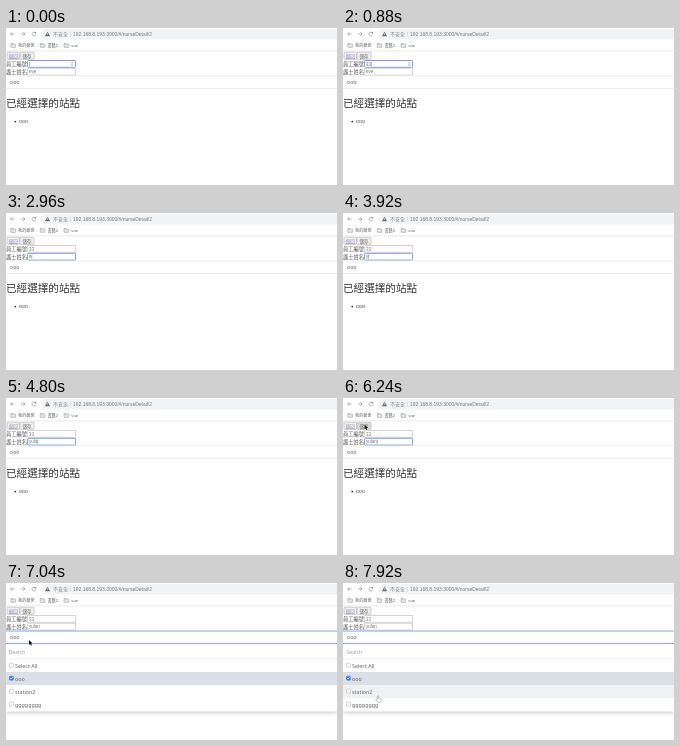
These frames come from a looping animation (331x157 px, 8 s). An HTML page with a canvas:

```html
<!DOCTYPE html>
<html lang="zh-Hant">
<head>
<meta charset="utf-8">
<title>Nurse detail</title>
<style>
html, body { margin: 0; width: 100%; height: 100%; overflow: hidden; background: #fff; }
canvas { display: block; width: 331px; height: 157px; }
</style>
</head>
<body>
<canvas id="stage"></canvas>
<script>
const W = 331, H = 157, LOOP = 8000;
const SANS = '"Liberation Sans", "Noto Sans CJK TC", "Noto Sans CJK", sans-serif';
const ROUND = '"Noto Sans", "Noto Sans CJK TC", "Noto Sans CJK", sans-serif';
const INK = '#85888c', LABEL = '#5c5c5c', VALUE = '#777', BLUE = '#7f9be6';
const canvas = document.getElementById('stage');
const ctx = canvas.getContext('2d');
const dpr = window.devicePixelRatio || 1;
canvas.width = W * dpr;
canvas.height = H * dpr;

// Time-ordered [ms, value] steps
const ID_STEPS = [[0, ''], [640, '3'], [880, '33']];
const NAME_STEPS = [[0, 'eve'], [2480, 'ev'], [2720, 'e'], [3120, ''], [3760, 'y'],
  [4080, 'yu'], [4400, 'yul'], [4640, 'yula'], [5040, 'yulan']];
const FOCUS_STEPS = [[0, 'id'], [2000, 'name'], [6400, ''], [6960, 'select']];

// [ms, x, y, shape]
const MOUSE = [
  [1040, 62, 37, 'beam'], [1440, 50, 42, 'beam'], [1920, 42, 43, 'beam'], [2160, 42, 43, ''],
  [5760, 40, 53, 'arrow'], [6080, 23, 30, 'arrow'], [6200, 21.5, 26.5, 'arrow'],
  [6480, 21.5, 26.5, 'arrow'], [6800, 23, 57, 'arrow'], [7200, 23, 57, 'arrow'],
  [7520, 27, 81, 'hand'], [7720, 33, 108, 'hand'], [7840, 34.5, 113, 'hand'], [8000, 34.5, 113, 'hand']
];

const stepAt = (steps, t) => steps.reduce((s, next) => t >= next[0] ? next : s);

// The caret restarts its blink on every key or focus change
function caretVisible(t) {
  const last = Math.max(...[ID_STEPS, NAME_STEPS, FOCUS_STEPS].map(s => stepAt(s, t)[0]));
  return (t - last) % 1000 < 500;
}

function mouseAt(t) {
  for (let i = 0; i < MOUSE.length - 1; i++) {
    const [t0, x0, y0, shape] = MOUSE[i], [t1, x1, y1] = MOUSE[i + 1];
    if (shape && t >= t0 && t < t1) {
      const k = (t - t0) / (t1 - t0), e = k * k * (3 - 2 * k);
      return { x: x0 + (x1 - x0) * e, y: y0 + (y1 - y0) * e, shape };
    }
  }
  return null;
}

function rect(x, y, w, h, color) {
  ctx.fillStyle = color;
  ctx.fillRect(x, y, w, h);
}

function box(x, y, w, h, r, fill, stroke, line = 0.7) {
  ctx.beginPath();
  ctx.roundRect(x, y, w, h, r);
  if (fill) { ctx.fillStyle = fill; ctx.fill(); }
  if (stroke) { ctx.strokeStyle = stroke; ctx.lineWidth = line; ctx.stroke(); }
}

function text(s, x, y, size, color, family = SANS) {
  ctx.font = `${size}px ${family}`;
  ctx.textBaseline = 'alphabetic';
  ctx.fillStyle = color;
  ctx.fillText(s, x, y);
  return ctx.measureText(s).width;
}

function stroke(points, color, width) {
  ctx.beginPath();
  points.forEach(([x, y], i) => i ? ctx.lineTo(x, y) : ctx.moveTo(x, y));
  ctx.strokeStyle = color;
  ctx.lineWidth = width;
  ctx.stroke();
}

function bookmark(x, label, size) {
  rect(x, 15.3, 2.4, 0.8, '#a5a8ab');
  box(x + 0.2, 16, 4.8, 3.4, 0.4, '#e3e4e6', '#a5a8ab', 0.6);
  text(label, x + 7.4, 19.1, size, '#66696d');
}

function browser() {
  stroke([[8.6, 6], [4.6, 6]], INK, 0.6);
  stroke([[6.4, 4.2], [4.6, 6], [6.4, 7.8]], INK, 0.6);
  stroke([[15, 6], [19, 6]], INK, 0.6);
  stroke([[17.2, 4.2], [19, 6], [17.2, 7.8]], INK, 0.6);
  ctx.beginPath();
  ctx.arc(28, 6, 1.9, 0.3, 5.6);
  ctx.stroke();
  rect(28.6, 4.1, 1.6, 1.4, INK);

  box(35, 1, 310, 10.4, 5.2, '#f1f3f4');
  ctx.beginPath();
  ctx.moveTo(41.5, 3.8);
  ctx.lineTo(44.1, 8.2);
  ctx.lineTo(38.9, 8.2);
  ctx.fillStyle = '#6b6e72';
  ctx.fill();
  rect(41.2, 5.2, 0.6, 1.5, '#fff');
  text('不安全', 47, 8, 5, INK);
  rect(64, 3.6, 0.5, 5, '#c5c8cb');
  text('192.168.8.193:3000/#/nurseDetail/2', 67, 7.9, 4.98, '#76797d');

  bookmark(4.6, '我的最愛', 4.15);
  bookmark(34, '書籍2', 4.2);
  bookmark(57.8, 'vue', 4.4);
  rect(0, 22.6, W, 0.7, '#e0e2e4');
}

function button(x, w, label, color, fill, linked) {
  box(x, 24.2, w, 7.2, 0.8, fill, '#b4b4b4', 0.6);
  text(label, x + (w - 9) / 2, 29.5, 4.5, color);
  if (linked) rect(x + (w - 9) / 2, 30, 9, 0.4, color);
}

function input(y, value, focused, caretOn) {
  box(21.6, y, 48, 6.8, focused ? 0.8 : 0, '#fff', focused ? BLUE : '#b8b8b8', focused ? 1 : 0.6);
  const w = text(value, 23, y + 5, 4.5, VALUE);
  if (focused && caretOn) rect(23.2 + w, y + 1.3, 0.4, 4.4, '#555');
}

function spinner(x, y) {
  box(x - 1.3, y - 2.4, 2.6, 4.8, 0.6, '#ececf0');
  stroke([[x - 0.7, y - 0.7], [x, y - 1.5], [x + 0.7, y - 0.7]], BLUE, 0.6);
  stroke([[x - 0.7, y + 0.7], [x, y + 1.5], [x + 0.7, y + 0.7]], BLUE, 0.6);
}

function option(y, label, checked, fill) {
  if (fill) rect(0, y - 6.5, W, 13, fill);
  box(3.4, y - 2.3, 4, 4, 0.8, checked ? '#3b7be0' : '#fff', checked ? '#3b7be0' : '#a8a8a8', 0.5);
  if (checked) stroke([[4.2, y - 0.3], [5, y + 0.6], [6.7, y - 1.4]], '#fff', 0.6);
  text(label, 9, y + 2.1, 5.35, '#666', ROUND);
}

function dropdown(mouse, caretOn) {
  ctx.save();
  ctx.shadowColor = 'rgba(0,0,0,.2)';
  ctx.shadowBlur = 4 * dpr;
  ctx.shadowOffsetY = dpr;
  rect(0, 61, W, 67.5, '#fff');
  ctx.restore();
  rect(0, 60.2, W, 0.9, BLUE);
  text('Search', 4, 71, 4.7, '#9a9a9a', ROUND);
  if (caretOn) rect(3.5, 66.5, 0.4, 5, '#777');
  rect(0, 75.6, W, 0.6, '#e4e6e9');
  const rows = ['Select All', 'ooo', 'station2', 'gggggggg'];
  rows.forEach((label, i) => {
    const y = 82.5 + i * 13;
    const hover = mouse && mouse.y >= y - 6.5 && mouse.y < y + 6.5;
    option(y, label, i === 1, i === 1 ? '#dbdfe6' : hover ? '#eff1f3' : '');
  });
}

function drawMouse({ x, y, shape }) {
  if (shape === 'beam') {
    stroke([[x, y - 3], [x, y + 3]], '#888', 0.5);
    stroke([[x - 1, y - 3.2], [x + 1, y - 3.2]], '#888', 0.4);
    stroke([[x - 1, y + 3.2], [x + 1, y + 3.2]], '#888', 0.4);
    return;
  }
  const arrow = [[0, 0], [0, 5], [1.2, 4], [2, 5.7], [2.9, 5.3], [2.1, 3.7], [3.6, 3.6]];
  const hand = [[0, 0], [0.9, 0], [1, 2], [3.3, 2.6], [3.4, 4.4], [2.6, 6], [0.4, 6], [-1.7, 3.6], [-1, 3], [0, 3.8]];
  ctx.beginPath();
  (shape === 'hand' ? hand : arrow).forEach(([dx, dy]) => ctx.lineTo(x + dx, y + dy));
  ctx.closePath();
  ctx.fillStyle = shape === 'hand' ? '#fff' : '#111';
  ctx.strokeStyle = shape === 'hand' ? '#555' : '#fff';
  ctx.lineWidth = 0.6;
  ctx.stroke();
  ctx.fill();
}

function draw(t) {
  const focus = stepAt(FOCUS_STEPS, t)[1], mouse = mouseAt(t);
  const open = focus === 'select', caretOn = caretVisible(t);
  const overSave = mouse && mouse.x > 14 && mouse.x < 28 && mouse.y > 24 && mouse.y < 31.5;

  ctx.setTransform(dpr, 0, 0, dpr, 0, 0);
  rect(0, 0, W, H, '#fff');
  browser();
  button(1, 12.5, '返回', '#9a86bd', '#f0f0f0', true);
  button(14, 14, '儲存', LABEL, overSave ? '#dcdcdc' : '#f0f0f0');
  text('員工編號', 0, 37.5, 5.25, LABEL);
  input(32.5, stepAt(ID_STEPS, t)[1], focus === 'id', caretOn);
  if (focus === 'id') spinner(66.2, 35.9);
  text('護士姓名', 0, 45.5, 5.25, LABEL);
  input(40.3, stepAt(NAME_STEPS, t)[1], focus === 'name', caretOn);

  rect(0, 47.6, W, open ? 0.9 : 0.6, open ? BLUE : '#dddfe2');
  text('ooo', 4, 56.2, 5.2, '#666', ROUND);
  if (open) {
    dropdown(mouse, caretOn);
  } else {
    rect(0, 60.3, W, 0.6, '#dddfe2');
    text('已經選擇的站點', 0, 79.3, 10.6, '#333');
    ctx.beginPath();
    ctx.arc(9.3, 93.6, 0.9, 0, Math.PI * 2);
    ctx.fill();
    text('ooo', 13, 95.4, 5.3, LABEL);
  }
  if (mouse) drawMouse(mouse);
}

function tick(now) {
  draw(now % LOOP);
  requestAnimationFrame(tick);
}
requestAnimationFrame(tick);
</script>
</body>
</html>
```
